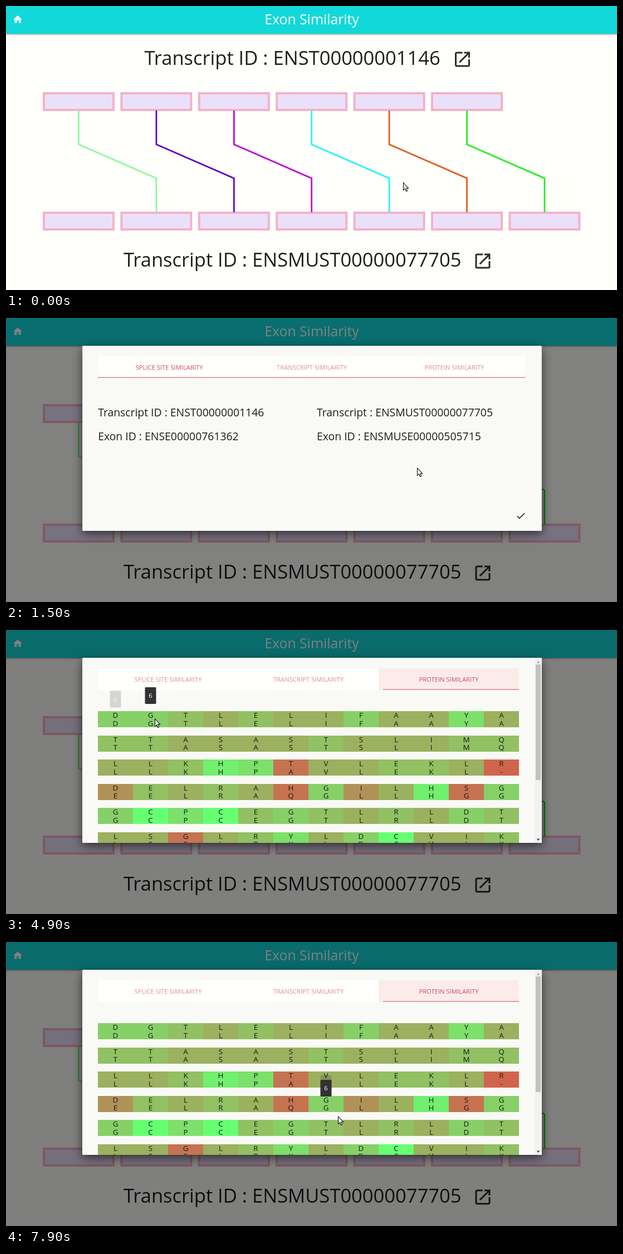
These frames come from a looping animation (1097 px wide and 511 px high, 8 s). An HTML page:

```html
<!DOCTYPE html>
<html lang="en">
<head>
<meta charset="utf-8">
<title>Exon Similarity</title>
<style>
  html, body { margin: 0; width: 100%; height: 100%; overflow: hidden; background: #fffffb; }
  svg { display: block; width: 100vw; height: 100vh; font-family: "Open Sans", "Noto Sans", sans-serif; }
  .bar { filter: drop-shadow(0 1px 1.5px #0007); }
  .sheet { filter: drop-shadow(0 5px 9px #0009); }
</style>
</head>
<body>
<svg id="stage" viewBox="0 0 1097 511"></svg>
<script>
const LOOP = 8000, STEP = 100;
const MODAL_AT = 1280, GRID_AT = 2600;
const stage = document.getElementById('stage');

const HOME = 'M10 20v-6h4v6h5v-8h3L12 3 2 12h3v8z';
const OPEN = 'M19 19H5V5h7V3H5c-1.11 0-2 .9-2 2v14c0 1.1.89 2 2 2h14c1.1 0 2-.9 2-2v-7h-2v7zM14 3v2h3.59l-9.83 9.83 1.41 1.41L19 6.41V10h2V3h-7z';
const CHECK = 'M9 16.17L4.83 12l-1.42 1.41L9 19 21 7l-1.41-1.41z';
const ARROW = 'M.5 0V13.6l3.1-2.9 2 4.8 2.1-.9-2-4.7h4z';
const HAND = 'M-1 8V1.6a1.2 1.2 0 0 1 2.4 0V5.6l5.6 1q1.8.4 1.6 2.2l-.8 4.4H1L-3.2 9.2q0-1.8 2.2-1.2z';
const IBEAM = 'M-3-6q3 0 3 2q0-2 3-2M0-4v11M-3 9q3 0 3-2q0 2 3 2M-1.5 3h3';

const LINES = ['#8bfa9d', '#5a00c8', '#b900d8', '#22f6fa', '#e25a18', '#22ee22'];
const HOVERED = 4;

// Aligned protein rows: upper and lower sequence
const ROWS = [
  ['DGTLELIFAAYA', 'DGTLELIFAAYA'],
  ['TTASASTSLIMQ', 'TTASASTSLIMQ'],
  ['LLKHPTVLEKLR', 'LLKHPAVLEKL-'],
  ['DELRAHGILHSG', 'EELRAQGLLHGG'],
  ['GCPCEGTLRLDT', 'GCPCEGTLRLDT'],
  ['LSGLRYLDCVIK', 'LSSLRYLDCVIK'],
];
const MATCH = ['ALSIV', 'TEKRMQ', 'DGF', 'PY', 'H', 'C'];  // scores 4 to 9
const LEFT = 165, TOP = 146, CELL = 63, PITCH = 43.5, LETTER = 14.5;

// Pointer path: time, x, y
const PATH = [
  [0, 713, 318], [300, 713, 314], [400, 713, 314], [800, 738, 270], [1900, 738, 270],
  [2400, 798, 85], [3100, 798, 85], [3400, 737, 107], [4000, 194, 126], [4200, 203, 134],
  [4400, 205, 155], [4900, 267, 160], [6000, 447, 163], [6580, 541, 174], [6700, 575, 213],
  [6900, 574, 240], [7200, 520, 250], [7800, 574, 312], [7900, 596, 314],
];

const clamp = v => Math.max(0, Math.min(1, v));
const mix = (a, b, p) => a + (b - a) * p;
const easeOut = (p, power = 3) => 1 - (1 - clamp(p)) ** power;

const rect = (x, y, w, h, fill, extra = '') =>
  `<rect x="${x}" y="${y}" width="${w}" height="${h}" fill="${fill}" ${extra}/>`;
const text = (x, y, size, str, fill = '#1e1e1e', anchor = 'start') =>
  `<text x="${x}" y="${y}" font-size="${size}" fill="${fill}" text-anchor="${anchor}">${str}</text>`;
const icon = (d, x, y, scale, fill) =>
  `<path d="${d}" fill="${fill}" transform="translate(${x} ${y}) scale(${scale})"/>`;

function pointerAt(t) {
  const i = PATH.findIndex(k => k[0] > t);
  if (i < 0) return PATH.at(-1).slice(1);
  const [a, b] = [PATH[i - 1], PATH[i]], p = (t - a[0]) / (b[0] - a[0]);
  return [mix(a[1], b[1], p), mix(a[2], b[2], p)];
}

const overTabs = t => {
  const y = pointerAt(t)[1];
  return t > MODAL_AT && y > 69 && y < 107;
};

// The alignment letter under the pointer, if any
function letterAt(t) {
  const [x, y] = pointerAt(t);
  const col = Math.floor((x - LEFT) / CELL), row = Math.floor((y - TOP) / PITCH);
  const half = Math.floor((y - TOP - row * PITCH) / LETTER);
  return t >= GRID_AT && row >= 0 && half < 2 && col >= 0 && col < 12 ? { col, row, half } : null;
}

// Every letter the pointer crosses opens a tooltip that lingers after it leaves
function hovers() {
  const list = [];
  let open = null;
  for (let t = GRID_AT; t < LOOP; t += 10) {
    const spot = letterAt(t);
    if (open && spot && ['col', 'row', 'half'].every(k => spot[k] === open[k])) continue;
    if (open) open.exit = t + 200;
    open = spot && { ...spot, enter: t, exit: Infinity };
    if (open) list.push(open);
  }
  return list;
}
const TIPS = hovers();

function page(t) {
  const left = i => 68 + 139.4 * i;
  const box = (i, y) => rect(left(i), y, 125, 30, '#ebe0fa', 'stroke="#f5b1c8" stroke-width="4"');
  let out = rect(0, 0, 1097, 511, '#fffffb');
  for (let i = 0; i < 7; i++) out += (i < 6 ? box(i, 157) : '') + box(i, 372);
  LINES.forEach((color, i) => {
    const x = left(i) + 62.5;
    const thick = i === HOVERED && t >= 700 && t < MODAL_AT + STEP;
    out += `<path d="M${x} 188V249L${x + 139.4} 310V371" fill="none" stroke="${color}" stroke-width="${thick ? 10 : 2.7}"/>`;
  });
  return out
    + rect(0, 0, 1097, 50, '#12d8da', 'class="bar"')
    + icon(HOME, 11.4, 14.6, .8, '#fff')
    + text(549, 33, 24.75, 'Exon Similarity', '#fff', 'middle')
    + text(248.5, 106, 34.5, 'Transcript ID : ENST00000001146')
    + icon(OPEN, 801.5, 78, 1.5, '#2b2b2b')
    + text(211, 469, 34.5, 'Transcript ID : ENSMUST00000077705')
    + icon(OPEN, 838, 441, 1.5, '#2b2b2b');
}

function tabs(t, grid) {
  const width = grid ? 756 : 768, w = width / 3;
  const active = grid ? 2 : 0;
  const hover = overTabs(t) ? Math.floor((pointerAt(t)[0] - LEFT) / w) : -1;
  const lineX = mix(LEFT, 677, easeOut((t - GRID_AT - 50) / 300, 2));
  return rect(LEFT, 69, width, 39, '#fffffd')
    + (grid ? rect(LEFT + 2 * w, 69, w, 39, '#fbecea') : '')
    + ['SPLICE SITE', 'TRANSCRIPT', 'PROTEIN'].map((name, i) =>
        text(LEFT + w * (i + .5), 93, 11.24, name + ' SIMILARITY',
          i === active || i === hover ? '#c8496c' : '#dd8ca1', 'middle')).join('')
    + rect(lineX, 106.2, LEFT + width - lineX, 1.6, '#e08a9f');
}

const pairAt = (row, col) => ROWS[row].map(seq => seq[col]);

function score([a, b]) {
  if (a === b) return 4 + MATCH.findIndex(group => group.includes(a));
  return b === '-' ? -1 : /DE|IL/.test(a + b) ? 2 : 0;
}

function alignment() {
  let out = '';
  ROWS.forEach((_, row) => {
    const y = TOP + row * PITCH;
    for (let col = 0; col < 12; col++) {
      const pair = pairAt(row, col), s = score(pair), x = LEFT + col * CELL;
      const fill = `rgb(${197 - 10.5 * s},${115 + 15.5 * s},${80 + 3.8 * s})`;
      out += rect(x, y, CELL, 29, fill, 'shape-rendering="crispEdges"')
        + pair.map((ch, k) => text(x + CELL / 2, y + 12 + LETTER * k, 13.4, ch, '#1a1a1a', 'middle')).join('');
    }
  });
  return `<clipPath id="view"><path d="M137 50H949V383H137z"/></clipPath><g clip-path="url(#view)">${out}</g>`
    + rect(949, 50, 13, 333, '#f1f1f1') + rect(951, 62, 9, 208, '#c1c1c1')
    + '<path d="M952.5 59.5h6l-3-3.5z" fill="#a3a3a3"/><path d="M952.5 375.5h6l-3 3.5z" fill="#505050"/>';
}

function details() {
  return text(165, 177, 19.4, 'Transcript ID : ENST00000001146')
    + text(558, 177, 19.4, 'Transcript : ENSMUST00000077705')
    + text(165, 220, 19.4, 'Exon ID : ENSE00000761362')
    + text(558, 220, 19.4, 'Exon ID : ENSMUSE00000505715')
    + icon(CHECK, 914.8, 346.5, .8, '#212121');
}

function dialog(t) {
  const time = (t - MODAL_AT) / 250, p = easeOut(time), grid = t >= GRID_AT;
  const scale = mix(.8, 1, p), dy = -30.7 * (1 - p);
  return rect(0, 0, 1097, 511, '#000', `opacity="${.5 * easeOut(time, 2)}"`)
    + `<g opacity="${p}" transform="translate(549.5 ${216.5 + dy}) scale(${scale}) translate(-549.5 -216.5)">`
    + rect(137, 50, 825, 333, '#f9faf6', 'rx="1.5" class="sheet"')
    + tabs(t, grid) + (grid ? alignment() : details()) + '</g>';
}

function tooltip(t, { col, row, half, enter, exit }) {
  const shown = easeOut((t - enter) / 300) * (1 - easeOut((t - exit) / 250));
  if (shown <= 0) return '';
  const x = LEFT + CELL * (col + .5), y = TOP - 35 + PITCH * row + LETTER * half - 8 * shown;
  return `<g opacity="${shown}">${rect(x - 10, y, 20, 30, '#323232', 'rx="1.6"')}`
    + text(x, y + 19, 11.2, score(pairAt(row, col)), '#fff', 'middle') + '</g>';
}

function pointer(t) {
  const [x, y] = pointerAt(t), spot = letterAt(t);
  const at = `transform="translate(${x} ${y})"`;
  if (spot && Math.abs(x - LEFT - CELL * (spot.col + .5)) < 5)
    return `<path d="${IBEAM}" ${at} fill="none" stroke="#111" stroke-width="1.2"/>`;
  return `<path d="${overTabs(t) ? HAND : ARROW}" ${at} fill="#fff" stroke="#111" stroke-width="1.1" stroke-linejoin="round"/>`;
}

function status() {
  return rect(0, 494, 364, 17, '#b9f8f4')
    + text(1.5, 507, 11.75, '127.0.0.1:5000/visualize?transcript1=ENST00000001146&amp;transc…', '#527f7d');
}

function scene(t) {
  return page(t)
    + (t > MODAL_AT + STEP ? dialog(t) : '')
    + (t >= 2300 && t < 3600 ? status() : '')
    + TIPS.map(tip => tooltip(t, tip)).join('')
    + pointer(t);
}

let last = -1;
const start = performance.now();
function tick() {
  const t = Math.floor((performance.now() - start) % LOOP / STEP) * STEP;
  if (t !== last) stage.innerHTML = scene(last = t);
  requestAnimationFrame(tick);
}
tick();
</script>
</body>
</html>
```
